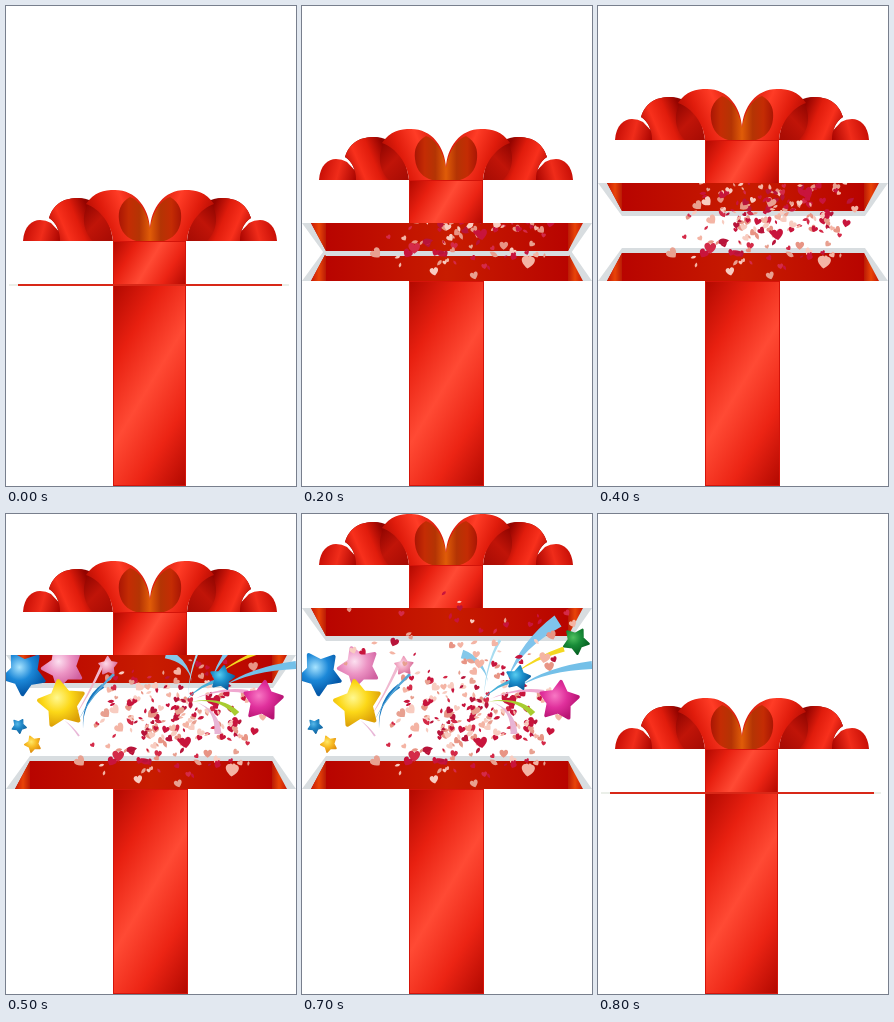
Write an HTML page with a canvas that moves like this. It is 290 px wide and 480 px high and loops after 1300 ms.

```html
<!DOCTYPE html>
<html>
<head>
<meta charset="utf-8">
<style>
html, body { margin: 0; width: 100%; height: 100%; overflow: hidden; background: #fff; }
canvas { display: block; }
</style>
</head>
<body>
<canvas id="stage" width="290" height="480"></canvas>
<script>
const ctx = document.getElementById('stage').getContext('2d');
const LIFTS = [0, 61, 81, 101, 137, 160, 184];

function random(seed) {
  return () => (seed = (seed * 16807) % 2147483647) / 2147483647;
}

function addStops(g, colors) {
  colors.forEach((c, i) => g.addColorStop(i / (colors.length - 1), c));
  return g;
}
const linear = (x0, y0, x1, y1, ...colors) => addStops(ctx.createLinearGradient(x0, y0, x1, y1), colors);
const radial = (x, y, r, ...colors) => addStops(ctx.createRadialGradient(x, y, 0, x, y, r), colors);

function fill(d, style) {
  ctx.fillStyle = style;
  ctx.fill(new Path2D(d));
}

function mirrored(draw, axis) {
  draw();
  ctx.save();
  ctx.translate(2 * axis, 0);
  ctx.scale(-1, 1);
  draw();
  ctx.restore();
}

// Confetti: a wide static cloud and a few high flyers
const rnd = random(4217);
const TINTS = ['#c8143c', '#d42a48', '#b8143a', '#c8143c', '#f4b4a4', '#e89484', '#f8ccc0', '#e8a090'];
function makeHearts(count, place) {
  return Array.from({ length: count }, () => ({
    ...place(), size: 1.8 + 1.8 * rnd() + 3 * rnd() ** 8, angle: rnd() * 6.28,
    petal: rnd() < 0.45, tint: TINTS[Math.floor(rnd() * TINTS.length)]
  }));
}
const cloud = makeHearts(230, () => ({ x: 74 + 93 * (rnd() + rnd()), y: 138 + 68 * (rnd() + rnd()) }));
const flyers = makeHearts(42, () => ({ x: 40 + 235 * rnd(), y: 65 + 85 * Math.sqrt(rnd()) }));
const HEART = new Path2D('M0 1C-1.6 -.1 -1.1 -1 -.5 -1Q-.1 -1 0 -.6Q.1 -1 .5 -1C1.1 -1 1.6 -.1 0 1Z');
const PETAL = new Path2D('M-1 0Q0 -1 1 -.2Q.4 .9 -1 0Z');

function drawHeart(h) {
  ctx.save();
  ctx.translate(h.x, h.y);
  ctx.rotate(h.petal ? h.angle : (h.angle - 3.14) * 0.25);
  ctx.scale(h.size, h.size);
  ctx.fillStyle = h.tint;
  ctx.fill(h.petal ? PETAL : HEART);
  ctx.restore();
}

function drawBow() {
  fill('M17 235C18 220 26 214 34 214Q40 214 45 217L62 235Z',
    linear(17, 225, 54, 235, '#c40c04', '#f02c1a', '#a80400'));
  fill('M43 212C48 196 60 192 72 192C92 192 104 210 107 235H54C54 225 50 216 43 212Z',
    linear(76, 200, 108, 230, '#8c0400', '#c01408', '#a80c04'));
  fill('M43 212C48 196 60 192 72 192Q78 192 84 196C75 206 76 225 87 235H54C54 225 50 216 43 212Z',
    linear(44, 225, 84, 208, '#b80c04', '#f8301c', '#e01c0c', '#940400'));
  fill('M80 198C88 186 98 184 109 184C130 184 143 202 144 223V235H107C106 218 94 203 80 198Z',
    linear(82, 222, 140, 198, '#a80800', '#e01c0c', '#ff3c26', '#d41808'));
  fill('M144 223C141 205 133 194 124 191C114 197 112 205 113 214C114 226 122 233 130 235H144Z',
    linear(112, 215, 144, 215, '#a81404', '#c42c04', '#b43404', '#e05c08'));
}

// Ribbon panel with a diagonal sheen
function column(x, y, w, h) {
  const reach = (w + 0.6 * h) / 1.36;
  ctx.fillStyle = linear(x, y, x + reach, y + 0.6 * reach, '#b00800', '#e82010', '#ff4a34', '#ec2414', '#b00800');
  ctx.fillRect(x, y, w, h);
  ctx.strokeStyle = '#d4140a';
  ctx.lineWidth = 1;
  ctx.strokeRect(x + .5, y + .5, w - 1, h - 1);
}

// One half of the open box; rim at y = 33, wide edge at y = 0
function drawTray(y, flip) {
  ctx.save();
  ctx.translate(0, y);
  ctx.scale(1, flip);
  fill('M0 0H290L267 33H24Z', '#d8dde0');
  fill('M9 0H279L266 28H24Z', linear(24, 0, 266, 0, '#b80400', '#c81c00', '#b80400'));
  mirrored(() => fill('M9 0H24V28Z', linear(9, 0, 25, 0, '#c81804', '#e84408', '#b41404')), 145);
  ctx.restore();
}

function star(x, y, r, degrees, light, mid, dark) {
  ctx.beginPath();
  for (let i = 0; i < 10; i++) {
    const a = degrees * Math.PI / 180 + i * Math.PI / 5;
    const d = i % 2 ? r * 0.52 : r * 0.93;
    ctx.lineTo(x + d * Math.cos(a), y + d * Math.sin(a));
  }
  ctx.closePath();
  ctx.fillStyle = ctx.strokeStyle = radial(x - r * .2, y - r * .25, r * 1.15, light, mid, dark);
  ctx.lineWidth = r * 0.16;
  ctx.lineJoin = 'round';
  ctx.fill();
  ctx.stroke();
}

// Streamer growing from a point to its full width at the far end
function streamer(x0, y0, cx, cy, x1, y1, width, color) {
  const angle = Math.atan2(y1 - cy, x1 - cx);
  const dx = -Math.sin(angle) * width / 2, dy = Math.cos(angle) * width / 2;
  ctx.beginPath();
  ctx.moveTo(x0, y0);
  ctx.quadraticCurveTo(cx + dx / 2, cy + dy / 2, x1 + dx, y1 + dy);
  ctx.lineTo(x1 - dx, y1 - dy);
  ctx.quadraticCurveTo(cx - dx / 2, cy - dy / 2, x0, y0);
  ctx.fillStyle = color;
  ctx.fill();
}

function drawParty() {
  streamer(186, 168, 182, 146, 160, 140, 9, '#84c8ea');
  streamer(182, 182, 184, 150, 198, 126, 3, '#a8dcf0');
  streamer(206, 164, 220, 130, 256, 107, 13, '#80c4ec');
  streamer(212, 160, 235, 143, 262, 135, 5, '#f4d820');
  streamer(218, 172, 245, 155, 290, 151, 8, '#74c0e8');
  streamer(180, 186, 195, 170, 214, 166, 4, '#48b0d8');
  streamer(182, 188, 212, 172, 242, 178, 4, '#f0a8d0');
  streamer(184, 188, 215, 182, 231, 200, 6, '#a8cc30');
  streamer(190, 188, 212, 196, 212, 220, 7, '#e8b4d4');
  streamer(77, 215, 76, 186, 97, 172, 4, '#1878c0');
  streamer(72, 207, 86, 180, 108, 160, 3, '#58a8d8');
  streamer(68, 204, 82, 182, 96, 152, 3, '#f0b8d0');
  streamer(58, 206, 66, 212, 73, 222, 2, '#e8b8d8');
  star(18, 159, 23, -50, '#a8e4ff', '#1c88d8', '#0458a8');
  star(57, 153, 22, -40, '#fce0f0', '#ec94c4', '#d060a0');
  star(56, 190, 25, -27, '#fff890', '#fcd818', '#dca008');
  star(102, 152, 10, -20, '#fcd8e8', '#f0a4c0', '#d86c98');
  star(13, 212, 8, -60, '#58b8e8', '#2088c8', '#1468a4');
  star(27, 230, 9, -40, '#ffe868', '#f8bc24', '#e09010');
  star(216, 164, 13, -80, '#58ccf0', '#1c90cc', '#0c60a0');
  star(257, 187, 21, -12, '#f878c4', '#e0309c', '#b81474');
  star(274, 127, 14, -60, '#50c060', '#188c38', '#086424');
}

function drawClosed() {
  column(107, 235, 73, 44);
  column(107, 279, 73, 201);
  ctx.fillStyle = '#d8e0d4';
  ctx.fillRect(3, 278.5, 280, 1);
  ctx.fillStyle = '#d82818';
  ctx.fillRect(12, 278, 264, 2);
}

function drawOpen(step, lift) {
  const top = 278 - lift;
  column(107, 275, 75, 205);
  drawTray(275, -1);
  column(107, 235 - lift, 74, 44);
  drawTray(top, 1);

  ctx.save();
  ctx.beginPath();
  ctx.rect(0, top, 290, 275 - top);
  ctx.clip();
  cloud.forEach(drawHeart);
  if (step > 3) drawParty();
  ctx.restore();
  if (step > 5) flyers.forEach(drawHeart);
}

function frame(now) {
  const t = now % 1300;
  const step = t < 200 || t >= 800 ? 0 : Math.floor((t - 200) / 100) + 1;
  const lift = LIFTS[step];
  ctx.clearRect(0, 0, 290, 480);
  if (step) drawOpen(step, lift);
  else drawClosed();
  ctx.translate(0, -lift);
  mirrored(drawBow, 144);
  ctx.setTransform(1, 0, 0, 1, 0, 0);
  requestAnimationFrame(frame);
}
frame(0);
</script>
</body>
</html>
```
